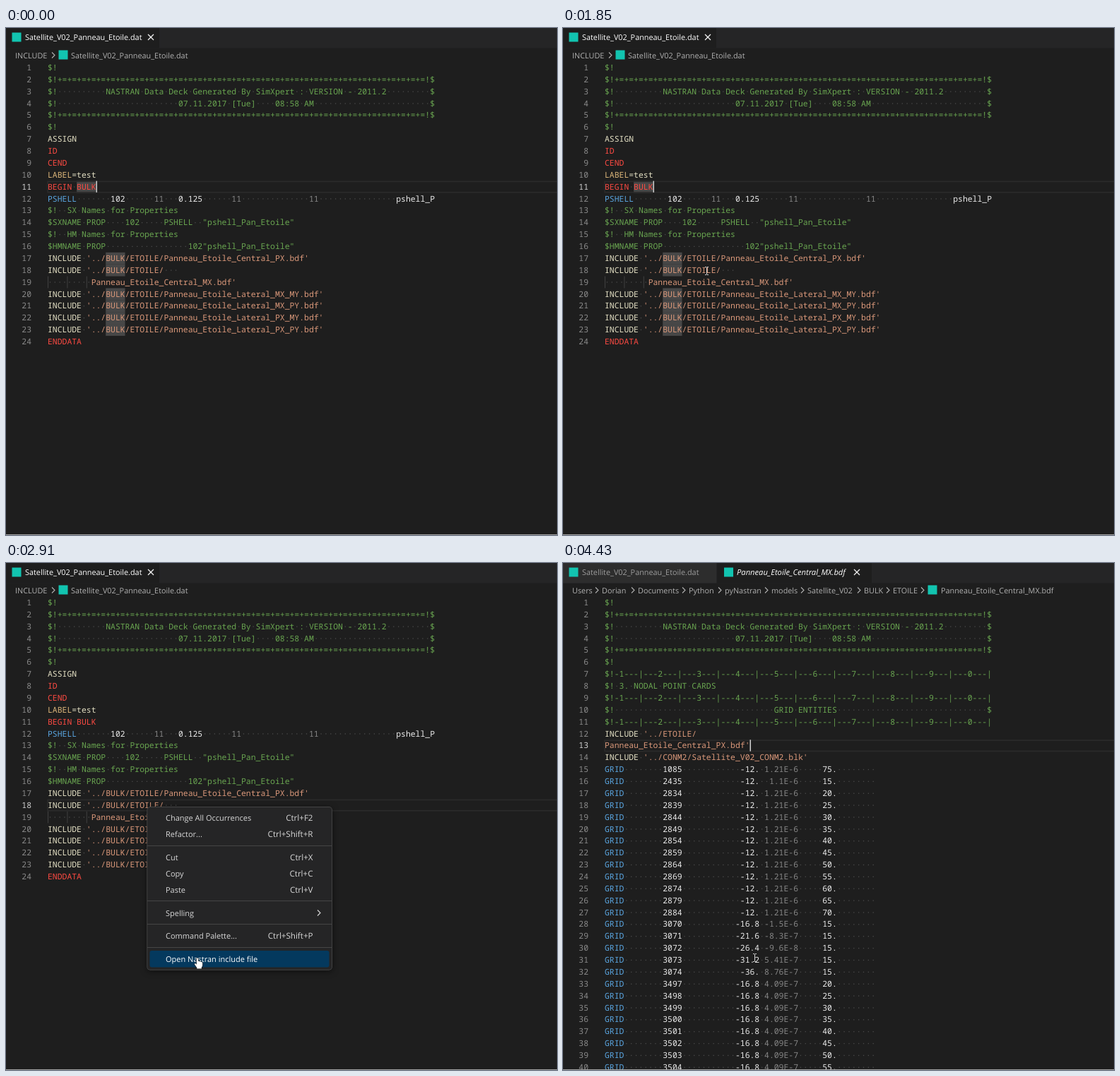
These frames come from a looping animation (780 by 718 pixels, 4.63 s). An HTML page with a canvas:

```html
<!DOCTYPE html>
<html lang="en">
<head>
<meta charset="utf-8">
<title>Open include file</title>
<style>
  html, body { margin: 0; width: 100%; height: 100%; overflow: hidden; background: #1e1e1e; }
  canvas { display: block; }
</style>
</head>
<body>
<canvas id="stage" width="780" height="718"></canvas>
<script>
const ctx = document.getElementById('stage').getContext('2d');
const W = 780, H = 718, LOOP = 4630;
const LEFT = 59, TOP = 47.9, CHAR = 6.85, LINE = 16.87;
const MONO = '11.42px "Noto Sans Mono", monospace';
const UI = '"Open Sans", "Noto Sans", sans-serif';
const C = {
  bg: '#1e1e1e', bar: '#252526', tab: '#2d2d2d', green: '#69a550', red: '#fb4a42',
  blue: '#5aa5e0', cream: '#e4e0c4', tan: '#dcb67a', string: '#da987a', text: '#ececec',
  dim: '#868686', dot: '#4b4b4b', teal: '#12c4b0', crumb: '#b0b0b0'
};

// ---- documents ----
const sp = n => ' '.repeat(n);
const header = [
  '$!',
  '$!' + '+='.repeat(38) + '!$',
  ('$!' + sp(10) + 'NASTRAN Data Deck Generated By SimXpert : VERSION - 2011.2').padEnd(79) + '$',
  ('$!' + sp(25) + '07.11.2017 [Tue]    08:58 AM').padEnd(79) + '$',
  '$!' + '+='.repeat(38) + '!$',
  '$!'
];
const include = name => `INCLUDE '../BULK/ETOILE/${name}`;
const lateral = side => include(`Panneau_Etoile_Lateral_${side}.bdf'`);

const deck = [
  ...header, 'ASSIGN', 'ID', 'CEND', 'LABEL=test', 'BEGIN BULK',
  ['PSHELL'.padEnd(8), ...['102', '11', '0.125', '11', '', '11', '', ''].map(v => v.padStart(8)), 'pshell_P'].join(''),
  '$!  SX Names for Properties',
  '$SXNAME PROP    102     PSHELL  "pshell_Pan_Etoile"',
  '$!  HM Names for Properties',
  '$HMNAME PROP' + sp(17) + '102"pshell_Pan_Etoile"',
  include("Panneau_Etoile_Central_PX.bdf'"),
  include('   '),
  sp(9) + "Panneau_Etoile_Central_MX.bdf'",
  ...['MX_MY', 'MX_PY', 'PX_MY', 'PX_PY'].map(lateral),
  'ENDDATA'
];

const ruler = '$!-1---|' + [2, 3, 4, 5, 6, 7, 8, 9, 0].map(n => `---${n}---|`).join('');
const grid = (id, x, y, z) =>
  'GRID'.padEnd(8) + [id, '', x, y, z + '.', ''].map(v => String(v).padStart(8)).join('');
const range = (n, f) => Array.from({ length: n }, (_, i) => f(i));

const nodes = [
  ...header, ruler, '$! 3. NODAL POINT CARDS', ruler,
  ('$!' + sp(33) + 'GRID ENTITIES').padEnd(79) + '$', ruler,
  "INCLUDE '../ETOILE/", "Panneau_Etoile_Central_PX.bdf'",
  "INCLUDE '../CONM2/Satellite_V02_CONM2.blk'",
  grid(1085, '-12.', '1.21E-6', 75), grid(2435, '-12.', '1.1E-6', 15),
  ...range(11, i => grid(2834 + 5 * i, '-12.', '1.21E-6', 20 + 5 * i)),
  ...['-1.5E-6', '-8.3E-7', '-9.6E-8', '5.41E-7', '8.76E-7'].map((y, i) =>
    grid(3070 + i, i === 4 ? '-36.' : (-16.8 - 4.8 * i).toFixed(1), y, 15)),
  ...range(8, i => grid(3497 + i, '-16.8', '4.09E-7', 20 + 5 * i))
];

// Colour of one character, by the kind of line it stands in
function colorAt(line, col, tinted) {
  if (line[0] === '$') return C.green;
  if (/^(ID|CEND|BEGIN|ENDDATA)/.test(line)) return C.red;
  if (/^(INCLUDE|ASSIGN)/.test(line)) return col < 7 ? C.cream : C.string;
  if (line.startsWith('LABEL')) return col < 5 ? C.tan : C.cream;
  if (/^(PSHELL|GRID)/.test(line)) {
    const field = col >> 3;
    return !field ? C.blue : field % 2 || !tinted ? C.text : C.dim;
  }
  return C.string;
}

// ---- drawing helpers ----
function rect(x, y, w, h, color) {
  ctx.fillStyle = color;
  ctx.fillRect(x, y, w, h);
}

function label(text, x, y, color, size = 10.85, style = '', align = 'left') {
  ctx.font = `${style} ${size}px ${UI}`;
  ctx.textAlign = align;
  ctx.fillStyle = color;
  ctx.fillText(text, x, y);
}

function stroke(points, color, width = 1) {
  ctx.beginPath();
  points.forEach(([x, y]) => ctx.lineTo(x, y));
  ctx.strokeStyle = color;
  ctx.lineWidth = width;
  ctx.stroke();
}

const icon = (x, y) => rect(x, y, 13, 13, C.teal);
const chevron = (x, y, color = C.crumb) => stroke([[x - 2, y - 4], [x + 2, y], [x - 2, y + 4]], color, 1.1);

function cross(x, y) {
  stroke([[x - 4, y - 4], [x + 4, y + 4]], '#f0f0f0', 1.2);
  stroke([[x + 4, y - 4], [x - 4, y + 4]], '#f0f0f0', 1.2);
}

function roundBox(x, y, w, h, r, color) {
  ctx.beginPath();
  ctx.roundRect(x, y, w, h, r);
  ctx.fillStyle = color;
  ctx.fill();
}

// ---- window parts ----
const lineTop = n => TOP + (n - 1) * LINE;

function drawEditor(lines, active, tinted) {
  ctx.strokeStyle = '#2b2b2b';
  ctx.lineWidth = 1.6;
  ctx.strokeRect(LEFT, lineTop(active) + 0.8, W, LINE - 1.6);
  ctx.font = MONO;
  ctx.textAlign = 'left';
  lines.forEach((line, i) => {
    const base = lineTop(i + 1) + 12.1;
    const num = String(i + 1);
    ctx.fillStyle = i + 1 === active ? '#d0d0d0' : '#8a8a8a';
    [...num].forEach((ch, k) => ctx.fillText(ch, 36 - (num.length - k) * CHAR, base));
    [...line].forEach((ch, col) => {
      const x = LEFT + col * CHAR;
      if (ch === ' ') return rect(x + 2.8, base - 4.3, 1.3, 1.3, C.dot);
      ctx.fillStyle = colorAt(line, col, tinted);
      ctx.fillText(ch, x, base);
    });
  });
}

function drawWordMarks() {
  deck.forEach((line, i) => {
    const col = line.indexOf('BULK');
    if (col >= 0) rect(LEFT + col * CHAR, lineTop(i + 1), 4 * CHAR, LINE, '#474747');
  });
}

function drawDeck(active) {
  rect(0, 0, W, 28.5, C.bar);
  rect(0, 0, 217, 28.5, C.bg);
  icon(8.5, 6.5);
  label('Satellite_V02_Panneau_Etoile.dat', 27, 17, '#ffffff');
  cross(205, 13);
  label('INCLUDE', 13, 43, C.crumb);
  chevron(67, 38.5);
  icon(74.5, 31.5);
  label('Satellite_V02_Panneau_Etoile.dat', 92, 43, C.crumb);
  if (active === 11) drawWordMarks();
  for (const col of [0, 4, 8]) rect(LEFT + col * CHAR, lineTop(19), 1, LINE, '#404040');
  drawEditor(deck, active, true);
}

const crumbs = [
  ['Users', 13], ['Dorian', 55], ['Documents', 106], ['Python', 178], ['pyNastran', 229],
  ['models', 295], ['Satellite_V02', 346], ['BULK', 426], ['ETOILE', 467]
];

function drawNodes(tinted) {
  rect(0, 0, W, 28.5, C.bar);
  rect(0, 0, 217, 28.5, C.tab);
  rect(218, 0, 219, 28.5, C.bg);
  icon(8.5, 6.5);
  label('Satellite_V02_Panneau_Etoile.dat', 27, 17, '#9c9c9c');
  icon(228, 6.5);
  label('Panneau_Etoile_Central_MX.bdf', 246, 17, '#ffffff', 11.2, 'italic');
  cross(416, 13);
  crumbs.forEach(([name, x], i) => {
    label(name, x, 43, C.crumb);
    chevron((crumbs[i + 1] || ['', 516])[1] - 7, 38.5);
  });
  icon(516.5, 31.5);
  label('Panneau_Etoile_Central_MX.bdf', 535, 43, C.crumb);
  drawEditor(nodes, 13, tinted);
}

const menu = [
  ['Change All Occurrences', 361, 'Ctrl+F2'], ['Refactor...', 384, 'Ctrl+Shift+R'],
  ['Cut', 417, 'Ctrl+X'], ['Copy', 440, 'Ctrl+C'], ['Paste', 463, 'Ctrl+V'],
  ['Spelling', 496, '>'], ['Command Palette...', 528, 'Ctrl+Shift+P'],
  ['Open Nastran include file', 561, '']
];
const hovered = (p, y) => p.x > 203 && p.x < 458 && Math.abs(p.y - y) < 12;

function drawMenu(p) {
  ctx.save();
  ctx.shadowColor = 'rgba(0,0,0,.5)';
  ctx.shadowBlur = 8;
  ctx.shadowOffsetY = 2;
  roundBox(199.3, 345, 262.7, 231.7, 5, '#454545');
  ctx.restore();
  roundBox(200.2, 345.9, 260.9, 229.9, 4, C.bar);
  for (const y of [400, 478, 511, 544]) rect(200, y, 261, 1, '#454545');
  for (const [name, y, key] of menu) {
    const on = hovered(p, y);
    const color = on ? '#ffffff' : '#d8d8d8';
    if (on) roundBox(203.5, y - 12, 254, 23.6, 3, '#04395e');
    label(name, 226, y + 4, color, 11);
    if (key === '>') chevron(443, y - 0.5, color);
    else label(key, 434.5, y + 4, color, 11.6, '', 'right');
  }
}

// ---- pointer ----
const path = [
  [530, 644, 218], [660, 500, 262], [855, 318, 311], [1050, 273, 322], [1190, 273, 322],
  [1650, 206, 343], [1900, 200, 345], [2120, 200, 345], [2250, 193, 358], [2315, 190, 372],
  [2447, 226, 448], [2578, 260, 499], [2710, 266, 531], [2780, 268, 539], [2845, 270, 551],
  [2910, 271, 559]
];

function pointerAt(t) {
  const i = path.findIndex(k => k[0] > t);
  if (i < 0) return { x: 271, y: 559 };
  if (!i) return { x: -50, y: -50 };
  const [a, b] = [path[i - 1], path[i]];
  const f = (t - a[0]) / (b[0] - a[0]);
  return { x: a[1] + (b[1] - a[1]) * f, y: a[2] + (b[2] - a[2]) * f };
}

const shapes = {
  arrow: 'M0 0V11.6L2.7 9.1L4.5 13.1L6.4 12.3L4.7 8.4H8.3Z',
  hand: 'M-1.2 1Q0-.6 1.2 1V5Q2.5 4.2 3.4 5.4Q4.8 4.8 5.4 6.1Q7.2 5.8 7.2 7.6V10.5Q7.2 12.5 5.8 13.5V15.4H-.8V13.9L-4 9.6Q-4.2 7.6-2.6 8.2L-1.2 9.4Z',
  beam: 'M-2.5-5.5H-.7L0-4.8L.7-5.5H2.5M0-4.8V4.8M-2.5 5.5H-.7L0 4.8L.7 5.5H2.5'
};

function drawPointer(p, open) {
  const kind = !open || p.x < 199 ? 'beam' : menu.some(m => hovered(p, m[1])) ? 'hand' : 'arrow';
  const shape = new Path2D(shapes[kind]);
  ctx.save();
  ctx.translate(Math.round(p.x) + (kind === 'beam' ? 0.5 : 0), Math.round(p.y));
  ctx.lineWidth = 1;
  ctx.strokeStyle = kind === 'beam' ? '#d8d8d8' : '#000000';
  ctx.stroke(shape);
  if (kind !== 'beam') {
    ctx.fillStyle = '#ffffff';
    ctx.fill(shape);
  }
  ctx.restore();
}

// ---- timeline: start, end and number of steps of each burst of changes ----
const bursts = [
  [0, 0, 0], [200, 200, 0], [530, 1050, 8], [1190, 1650, 7], [1720, 2120, 6],
  [2250, 2710, 7], [2780, 2910, 2], [3300, 3500, 3], [3700, 3700, 0],
  [3960, 3960, 0], [4430, 4430, 0]
];
const PRESS = 1900, MENU = 1980, CHOOSE = 3300, OPENED = 3420, TINTED = 3700;

function snap(t) {
  const [start, end, n] = bursts.filter(b => b[0] <= t).pop();
  if (!n) return start;
  const step = (end - start) / n;
  return start + Math.min(n, Math.floor((t - start) / step + 1e-6)) * step;
}

const within = (t, spans) => spans.some(([a, b]) => t >= a && t < b);
const caretOn = [
  [0, 200], [700, 1190], [1720, MENU], [CHOOSE, OPENED], [3500, 3960], [4430, LOOP]
];

function draw(t) {
  const p = pointerAt(t);
  const open = within(t, [[MENU, CHOOSE]]);
  const [row, col] = t >= OPENED ? [13, 30] : t >= PRESS ? [18, 21] : [11, 10];
  rect(0, 0, W, H, C.bg);
  if (t >= OPENED) drawNodes(t >= TINTED);
  else drawDeck(row);
  if (within(t, caretOn))
    rect(LEFT + col * CHAR, lineTop(row), 1.5, LINE - 0.6, '#d0d0d0');
  if (open) drawMenu(p);
  drawPointer(p, open);
  rect(0, H - 1, W, 1, '#a0a0a0');
}

let shown = -1;
const begin = performance.now();
ctx.textRendering = 'geometricPrecision';

function tick() {
  const t = snap((performance.now() - begin) % LOOP);
  if (t !== shown) draw(shown = t);
  requestAnimationFrame(tick);
}
tick();
</script>
</body>
</html>
```
